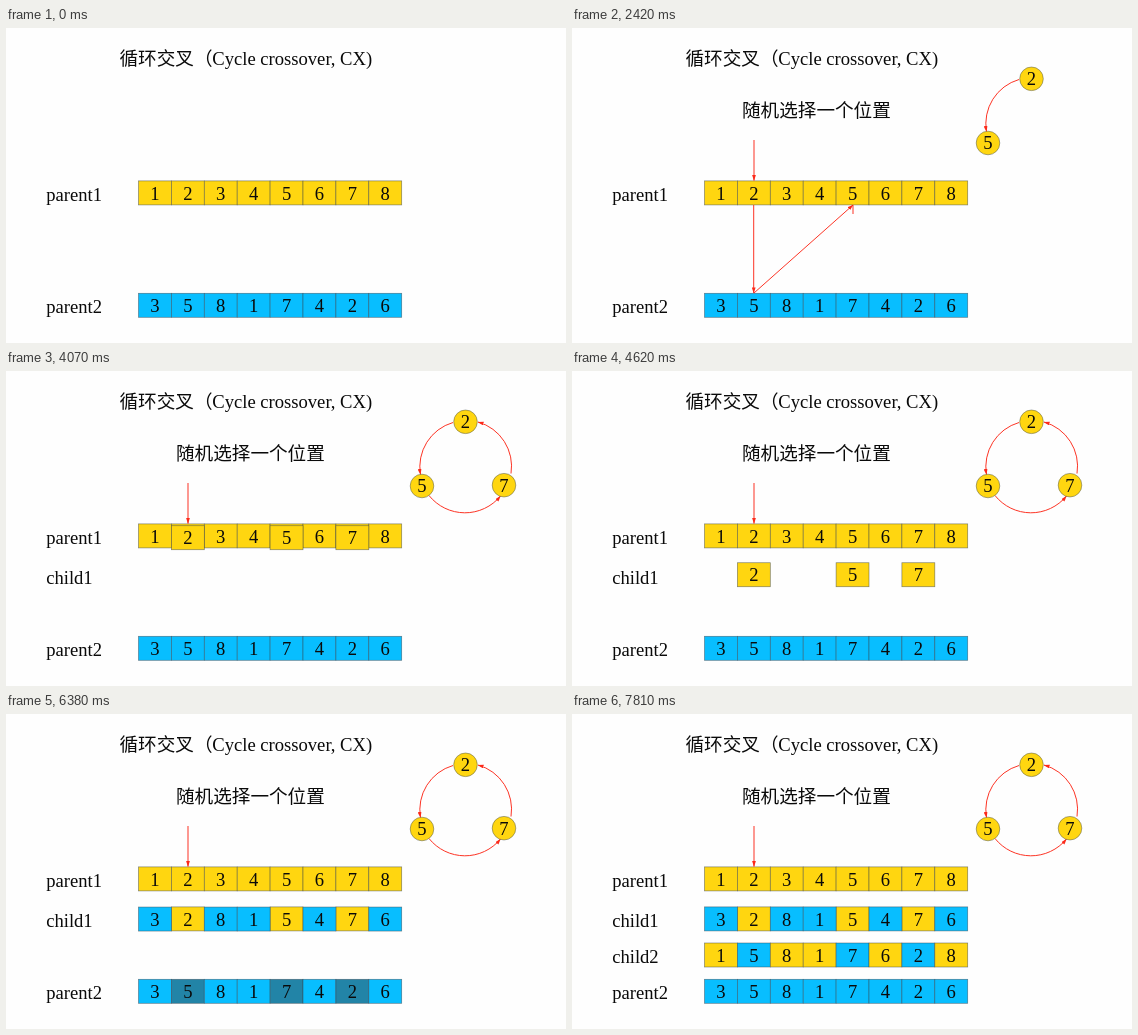
Animation of 560 by 315 pixels, one loop 9.68 s. Source, as an HTML page:

```html
<!DOCTYPE html>
<html lang="zh">
<head>
<meta charset="utf-8">
<title>Cycle crossover</title>
<style>
  html, body { margin: 0; width: 100%; height: 100%; overflow: hidden; background: #fefefe; }
  svg { display: block; width: 560px; height: 315px; }
  text { font: 18.6px "Liberation Serif", "Times New Roman", serif; fill: #0a0a0a; }
  .cjk { font-family: "Noto Sans CJK SC", "Noto Sans CJK", sans-serif; font-weight: 300; }
  .num { text-anchor: middle; }
  .box, .disc { stroke: #37414c; stroke-opacity: .62; stroke-width: .7; }
  .arrow { fill: none; stroke: #fc2a1a; stroke-width: .95; marker-end: url(#head); }
</style>
</head>
<body>
<svg id="stage" viewBox="0 0 560 315">
  <defs>
    <marker id="head" viewBox="0 0 6 4" refX="5.6" refY="2" markerWidth="6" markerHeight="4"
            markerUnits="userSpaceOnUse" orient="auto"><path d="M0 .1 6 2 0 3.9z" fill="#fc2a1a"/></marker>
  </defs>
  <text y="37"><tspan class="cjk" x="113.5">循环交叉（</tspan><tspan x="206.3">Cycle crossover, CX)</tspan></text>
  <text id="hint" class="cjk" x="170" y="89.3">随机选择一个位置</text>
</svg>
<script>
const LOOP = 9680, STEP = 110;
const GOLD = [255, 214, 16], BLUE = [8, 190, 255], DARK = [64, 64, 64];
const X0 = 132.5, W = 32.9, H = 24;
const ROW = { p1: 152.9, c1: 192.9, c2: 229, p2: 265.3 };
const stage = document.getElementById('stage');
const hint = document.getElementById('hint');

function add(parent, tag, attrs, text) {
  const el = document.createElementNS('http://www.w3.org/2000/svg', tag);
  for (const k in attrs) el.setAttribute(k, attrs[k]);
  if (text !== undefined) el.textContent = text;
  return parent.appendChild(el);
}
const group = () => add(stage, 'g', {});
const rgb = c => `rgb(${c.map(Math.round)})`;
const mix = (a, b, u) => a.map((v, i) => v + (b[i] - v) * u);
const show = (el, on) => el.setAttribute('visibility', on ? 'visible' : 'hidden');
const shift = (el, dy) => el.setAttribute('transform', `translate(0 ${dy.toFixed(2)})`);
const ease = u => (1 - Math.cos(Math.PI * u)) / 2;

function cell(parent, i, y, n, color) {
  const box = add(parent, 'rect', { class: 'box', x: X0 + i * W, y, width: W, height: H, fill: rgb(color) });
  add(parent, 'text', { class: 'num', x: X0 + (i + .5) * W, y: y + 18.7 }, n);
  return box;
}
function cells(parent, y, digits, color, only) {
  return [...digits].map((n, i) => !only || only.includes(i) ? cell(parent, i, y, n, color(i)) : null);
}
const label = (parent, y, s) => add(parent, 'text', { x: 40.2, y: y + 19.7 }, s);
function disc(x, y, n) {
  const g = group();
  add(g, 'circle', { class: 'disc', cx: x, cy: y, r: 11.8, fill: rgb(GOLD) });
  add(g, 'text', { class: 'num', x, y: y + 6.3 }, n);
  return g;
}

const cycle = [1, 4, 6], rest = [0, 2, 3, 5, 7];
const first = '12345678', second = '35817426';

label(stage, ROW.p1, 'parent1');
label(stage, ROW.p2, 'parent2');
cells(stage, ROW.p1, first, () => GOLD);
const lower = cells(stage, ROW.p2, second, () => BLUE);
const childLabel = label(stage, ROW.c1, 'child1');
const kept = group(), filled = group(), child2 = group();
cells(kept, ROW.c1, first, () => GOLD, cycle);
cells(filled, ROW.c1, second, () => BLUE, rest);
label(child2, ROW.c2, 'child2');
cells(child2, ROW.c2, '15817628', i => cycle.includes(i) ? BLUE : GOLD);

// path, wipe direction, start, end, hidden from
const arrows = [
  ['M182 112V152.5', 'down', 0, 550, LOOP],
  ['M181.7 177V265', 'down', 990, 1430, 3850],
  ['M182 265 281 177', 'up', 1540, 1870, 3850],
  ['M447 51.5A46 46 0 0 0 414.5 103.5', 'down', 1980, 2200, LOOP],
  ['M281 177V265', 'down', 2390, 2610, 3850],
  ['M281 265 347 177', 'up', 2560, 2860, 3850],
  ['M423 124.5A46 46 0 0 0 494.5 125', 'right', 2640, 2860, LOOP],
  ['M347 177V265', 'down', 2970, 3190, 3850],
  ['M347 265 182 177', 'up', 3080, 3300, 3850],
  ['M505 102.5A46 46 0 0 0 472 51', 'up', 3410, 3520, LOOP]
].map(([d, dir, from, to, until], i) => {
  const clip = add(add(stage, 'clipPath', { id: 'wipe' + i }), 'rect', {});
  const g = add(stage, 'g', { 'clip-path': `url(#wipe${i})` });
  const path = add(g, 'path', { class: 'arrow', d });
  const b = path.getBBox(), pad = 4;
  return { g, clip, dir, from, to, until,
    x: b.x - pad, y: b.y - pad, w: b.width + 2 * pad, h: b.height + 2 * pad };
});
const discs = [
  [disc(459.5, 50.8, 2), 880],
  [disc(416, 115, 5), 2090],
  [disc(498, 114.2, 7), 2640]
];

function draw(t) {
  const prog = (a, b) => Math.min(1, Math.max(0, (t - a) / (b - a)));

  hint.setAttribute('opacity', prog(0, 550));
  for (const a of arrows) {
    const u = prog(a.from, a.to), side = a.dir === 'right';
    const h = side ? a.h : a.h * u;
    show(a.g, u > 0 && t < a.until);
    a.clip.setAttribute('x', a.x);
    a.clip.setAttribute('y', a.dir === 'up' ? a.y + a.h - h : a.y);
    a.clip.setAttribute('width', side ? a.w * u : a.w);
    a.clip.setAttribute('height', h);
  }
  for (const [g, at] of discs) show(g, t >= at);

  show(childLabel, t >= 3850);
  show(kept, t >= 3850);
  shift(kept, (ROW.p1 - ROW.c1) * (1 - ease(prog(3970, 4700))));

  const shade = prog(4730, 5610) - prog(5995, 6710);
  for (const i of cycle) lower[i].setAttribute('fill', rgb(mix(BLUE, DARK, shade)));

  show(filled, t >= 5830);
  shift(filled, (ROW.p2 - ROW.c1) * (1 - ease(prog(5720, 6400))));

  show(child2, t >= 6820);
  shift(child2, 87 * (1 - prog(6710, 7370)));
}

const begin = performance.now();
function tick() {
  const t = (performance.now() - begin) % LOOP;
  draw(Math.floor(t / STEP) * STEP);
  requestAnimationFrame(tick);
}
tick();
</script>
</body>
</html>
```
